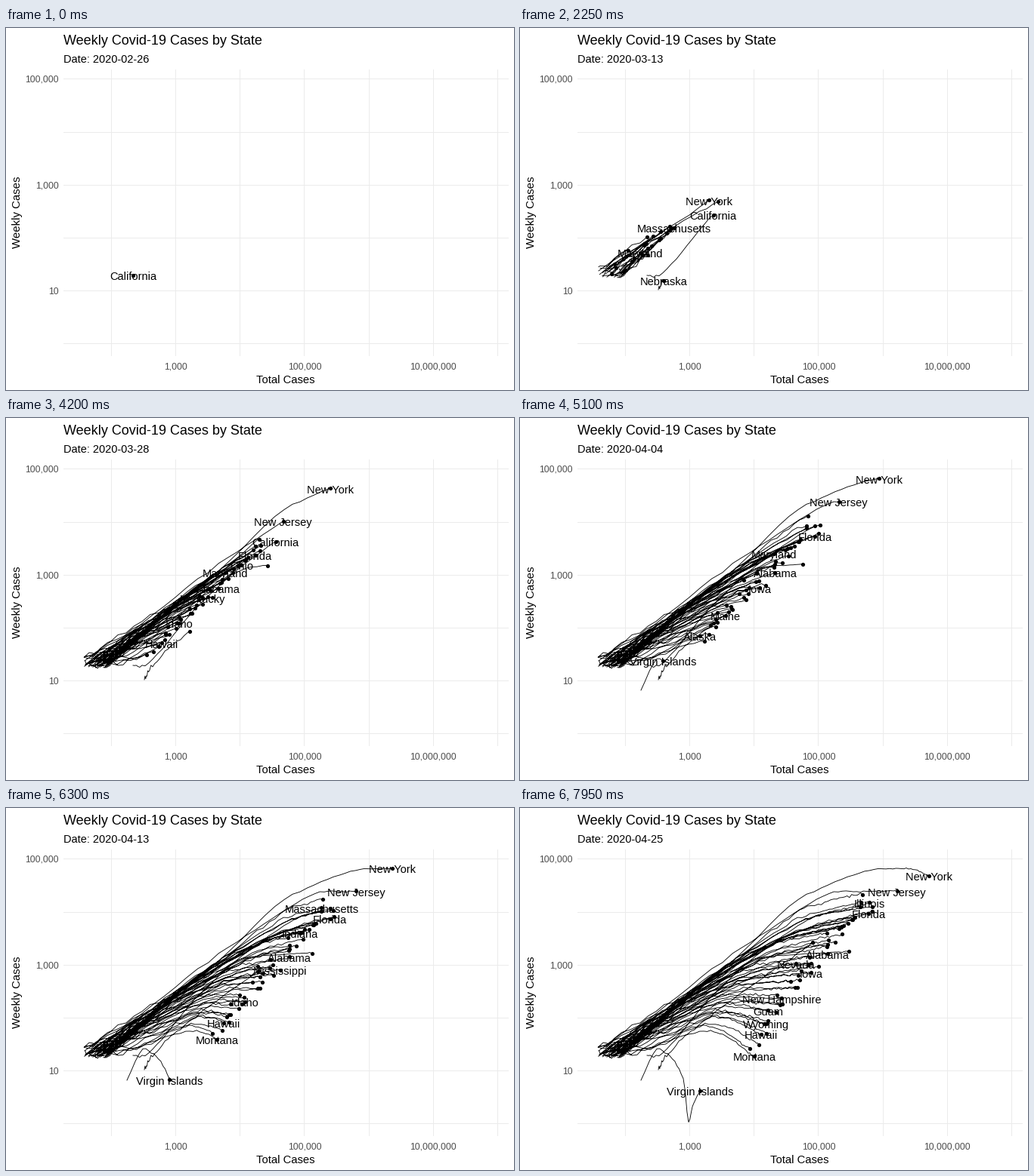
A matplotlib script for the animation above (8000 ms loop, 672 px wide and 480 px high).

```python
import matplotlib.pyplot as plt
import numpy as np
from matplotlib.animation import FuncAnimation

W, H = 672, 480
STEP_MS, TICK_MS, LOOP_MS = 150, 50, 8000
DAYS_PER_STEP = 111 / 99
LAST_DAY = 60
FIRST_DATE = np.datetime64("2020-02-26")
GRID, TICK = "#ebebeb", "#4d4d4d"

# From the largest outbreak to the smallest.
BY_SIZE = (
    "Pennsylvania,Illinois,Massachusetts,Texas,Michigan,Florida,Connecticut,Georgia,"
    "Louisiana,Ohio,Virginia,Indiana,Colorado,North Carolina,Maryland,Tennessee,"
    "Missouri,Wisconsin,Arizona,Alabama,South Carolina,Mississippi,Minnesota,Nevada,"
    "Kentucky,Utah,Iowa,Rhode Island,Kansas,Oklahoma,Arkansas,New Mexico,Oregon,"
    "New Hampshire,Delaware,Idaho,Maine,Guam,South Dakota,North Dakota,Wyoming,"
    "Vermont,Hawaii,West Virginia,Alaska,Montana"
).split(",")

# From the given day on, these names compete for labels, in this order.
LABELS = [
    (0, "New York,California,Massachusetts,Florida,Maryland,Nebraska"),
    (21, "New York,New Jersey,California,Florida,Georgia,Ohio,Maryland,Alabama,"
         "Kentucky,Hawaii,Idaho"),
    (32, "New York,New Jersey,Florida,Georgia,Maryland,Alabama,Iowa,Maine,Guam,"
         "Wyoming,Alaska,Virgin Islands"),
    (43, "New York,New Jersey,Massachusetts,Florida,Indiana,Alabama,Mississippi,"
         "Iowa,Idaho,Maine,Hawaii,Montana,Virgin Islands"),
    (50, "New York,New Jersey,Massachusetts,Florida,Ohio,Indiana,North Carolina,"
         "Alabama,Nevada,Kansas,Idaho,Guam,Alaska,Virgin Islands"),
    (56, "New York,New Jersey,Illinois,Florida,Louisiana,Iowa,Alabama,Nevada,"
         "New Hampshire,Guam,Wyoming,Hawaii,Montana,Virgin Islands"),
]

plt.rcParams["font.family"] = ["Liberation Sans", "DejaVu Sans"]
rng = np.random.default_rng(26)
states = {}


def ease_curve(t, days, values):
    """Monotone cubic curve through a few points."""
    h = np.diff(days)
    d = np.diff(values) / h
    same = d[:-1] * d[1:] > 0
    total = np.where(same, d[:-1] + d[1:], 1)
    inner = np.where(same, 2 * d[:-1] * d[1:] / total, 0)
    m = np.concatenate([[d[0]], inner, [d[-1] / 2]])
    i = np.clip(np.searchsorted(days, t, side="right") - 1, 0, len(h) - 1)
    s = (t - days[i]) / h[i]
    a, b = values[i], values[i + 1]
    return (a + (b - a) * s * s * (3 - 2 * s)
            + h[i] * s * (1 - s) * (m[i] * (1 - s) - m[i + 1] * s))


def add_state(name, *knots, rough=0.5):
    """One vertex per day along (day, x, y) knots, with noise that fades with age."""
    days, xs, ys = np.array(knots, float).T
    t = np.append(days[0], np.arange(np.floor(days[0]) + 1, LAST_DAY + 1))
    inside = np.minimum(t, days[-1])
    noise = rng.normal(size=len(t)) * (0.8 + 2.5 * np.exp((days[0] - t) / 7)) * rough
    noise[0] = 0
    states[name] = t, ease_curve(inside, days, xs), ease_curve(inside, days, ys) + noise


def add_typical(name, s):
    """Path of an ordinary state; s runs from 0 (largest) to 1 (smallest)."""
    dx, dy = rng.normal(0, (6, 3))
    add_state(
        name,
        (8 + 16 * s, rng.uniform(103, 138), rng.uniform(316, 331)),
        (26, 288 - 145 * s, 198 + 128 * s),
        (38, 392 - 152 * s + dx, 140 + 150 * s + dy),
        (59.4, 465 - 158 * s + dx, 122 + 160 * s + 43 * s ** 4 + dy),
        rough=1,
    )


for rank, state in enumerate(BY_SIZE):
    add_typical(state, rank / (len(BY_SIZE) - 1))

add_state("California", (0, 168, 328), (5, 180, 329), (17, 257, 246), (26, 319, 191),
          (38, 396, 142), (59.4, 466, 131))
add_state("Washington", (3, 118, 316), (17, 264, 229), (26, 323, 198), (59.4, 435, 190))
add_state("New York", (7, 104, 322), (17, 253, 227), (26, 379, 115), (38, 474, 81),
          (47, 511, 80), (59.4, 541, 90))
add_state("New Jersey", (13, 118, 322), (26, 306, 177), (38, 421, 111), (59.4, 499, 110))
add_state("Nebraska", (10, 183, 347), (17, 190, 335), (26, 218, 304), (59.4, 388, 178),
          rough=1)
add_state("Virgin Islands", (32, 160, 361), (36, 181, 320), (47, 216, 358),
          (50, 223, 417), (53, 228, 396), (59.4, 238, 375))

fig = plt.figure(figsize=(7, 5), dpi=96, facecolor="white")
ax = fig.add_axes([0, 0, 1, 1])
ax.set(xlim=(0, W), ylim=(H, 0))
ax.axis("off")


def text(x, y, s, px, color="black", **kw):
    kw.setdefault("va", "baseline")
    return ax.text(x, y, s, fontsize=px * 0.75, color=color, **kw)


def grid_x(power):
    return 224 + 85.2 * (power - 3)


def grid_y(power):
    return 418.2 - 70.15 * power


for power in range(2, 9):
    ax.plot([grid_x(power)] * 2, [55, 434], color=GRID, lw=0.75, zorder=0)
for power in range(6):
    ax.plot([76, 664], [grid_y(power)] * 2, color=GRID, lw=0.75, zorder=0)
for power in (3, 5, 7):
    text(grid_x(power) + 0.5, 452, f"{10 ** power:,}", 12.1, TICK, ha="center")
for power in (1, 3, 5):
    text(69.5, grid_y(power) + 4.5, f"{10 ** power:,}", 12.1, TICK, ha="right")

text(76, 22, "Weekly Covid-19 Cases by State", 18)
text(369.5, 471, "Total Cases", 14.8, ha="center")
text(15.5, 244, "Weekly Cases", 15, ha="center", va="center", rotation=90)
date_text = text(76, 46, "", 14.55)

trails, = ax.plot([], [], color="black", lw=0.65, zorder=2)
dots, = ax.plot([], [], "o", color="black", ms=3.9, mew=0, zorder=3)
labels = [text(0, 0, "", 14.6, ha="center", zorder=4) for _ in range(14)]


def overlaps(a, b):
    half_widths = 3.5 * (len(a[0]) + len(b[0]))
    return abs(a[1] - b[1]) < half_widths and abs(a[2] - b[2]) < 9


def draw(tick):
    day = tick * TICK_MS // STEP_MS * DAYS_PER_STEP
    date_text.set_text(f"Date: {FIRST_DATE + int(day)}")

    line_x, line_y, heads = [], [], {}
    for name, (t, x, y) in states.items():
        if t[0] > day:
            continue
        past = t <= day
        head = np.interp(day, t, x), np.interp(day, t, y)
        heads[name] = head
        line_x += [*x[past], head[0], np.nan]
        line_y += [*y[past], head[1], np.nan]
    trails.set_data(line_x, line_y)
    dots.set_data(*zip(*heads.values()))

    names = [group for since, group in LABELS if since <= day][-1].split(",")
    shown = []
    for name in names:
        if name in heads:
            item = (name, *heads[name])
            if not any(overlaps(item, other) for other in shown):
                shown.append(item)
    for i, label in enumerate(labels):
        name, x, y = shown[i] if i < len(shown) else ("", 0, 0)
        label.set_text(name)
        label.set_position((x, y + 6.3))
    return [trails, dots, date_text, *labels]


anim = FuncAnimation(fig, draw, frames=LOOP_MS // TICK_MS, interval=TICK_MS,
                     init_func=lambda: draw(0), repeat=True, repeat_delay=0)
plt.show()
```
